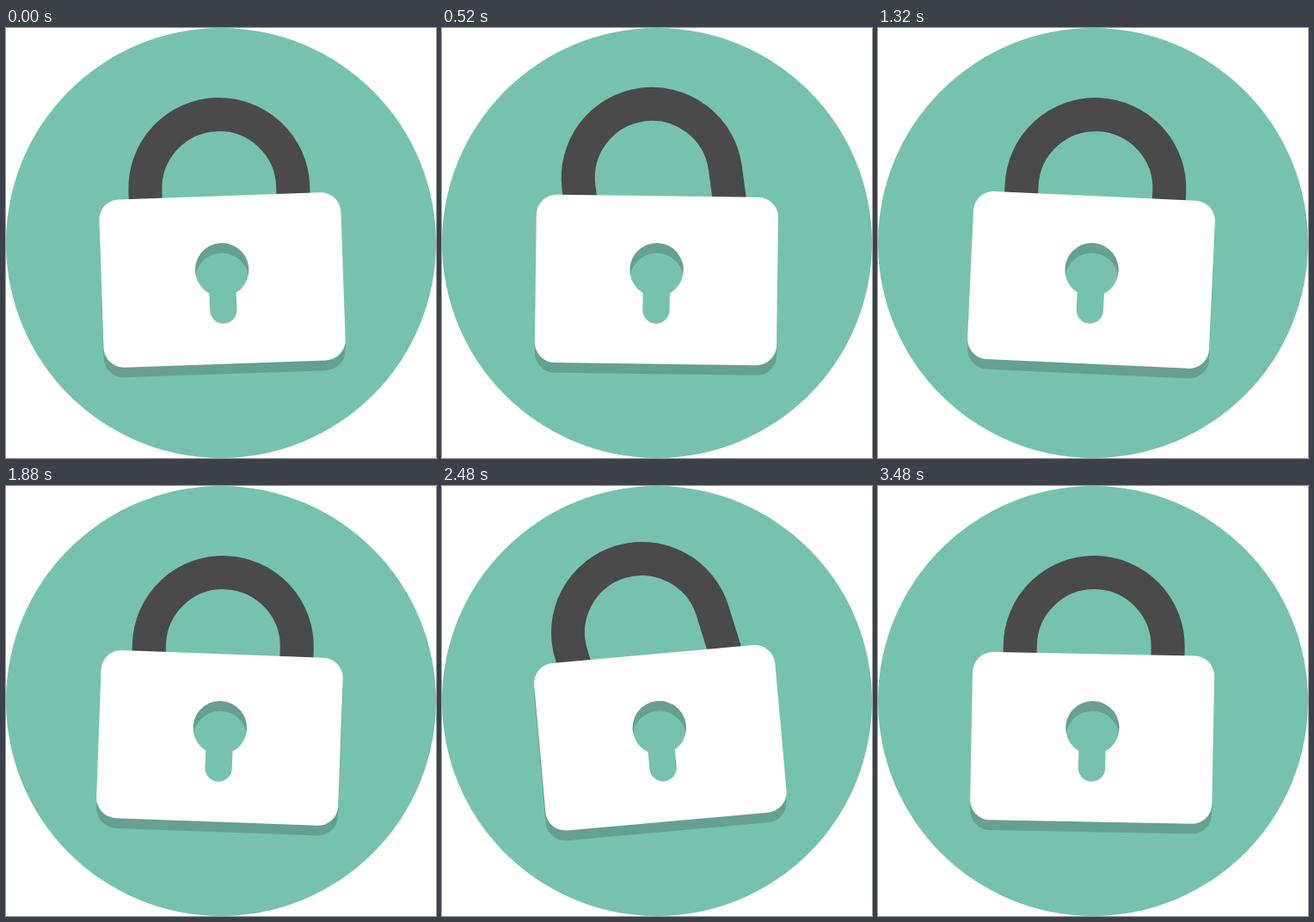
These frames come from a looping animation (500x500 px, 3.52 s). An HTML page:

```html
<!DOCTYPE html>
<html lang="en">
<head>
<meta charset="utf-8">
<title>Padlock</title>
<style>
  html, body { margin: 0; width: 100%; height: 100%; overflow: hidden; background: #fff; }
  svg { display: block; width: 100%; height: 100%; }
</style>
</head>
<body>
<svg viewBox="0 0 64 64">
  <defs>
    <path id="plate" fill-rule="evenodd" d="
      M17 25H47a3 3 0 0 1 3 3V47a3 3 0 0 1 -3 3H17a3 3 0 0 1 -3 -3V28a3 3 0 0 1 3 -3Z
      M30 39.46a4 4 0 1 1 4 0V42a2 2 0 0 1 -4 0Z"/>
  </defs>
  <circle cx="32" cy="32" r="32" fill="#76c2af"/>
  <g transform="translate(0 1.5)" opacity=".2"><use id="shadow" href="#plate" fill="#231f20"/></g>
  <g id="lock">
    <path id="shackle" d="M21 31V23.87a11 11 0 0 1 22 0V31" fill="none" stroke="#4a4a4a" stroke-width="5"/>
    <use href="#plate" fill="#fff"/>
  </g>
</svg>
<script>
const LOOP = 3520, STEP = 40;
const OPEN_EVERY = 2000, RISE = 327, FALL = 390, OPEN_ANGLE = 33;

// Turning points of the sway: [ms, degrees]
const sway = [[0, -2], [690, 1.2], [900, .9], [1570, 3.4], [1716, 3.4], [2375, -5.5], [3110, 2.4], [3900, -.5]];

// Sine easing from one turning point to the next
function tiltAt(t) {
  const i = sway.findIndex(([time]) => time > t);
  const [t0, a] = sway[i - 1], [t1, b] = sway[i];
  return a + (b - a) * (1 - Math.cos(Math.PI * (t - t0) / (t1 - t0))) / 2;
}

// The shackle speeds up while opening and slows down while closing
function openingAt(t) {
  const rise = t / RISE, fall = (t - RISE) / FALL;
  return OPEN_ANGLE * (rise < 1 ? rise ** 1.5 : Math.max(0, 1 - fall) ** 2);
}

const rotate = (id, angle, x, y) =>
  document.getElementById(id).setAttribute('transform', `rotate(${angle} ${x} ${y})`);

function draw(now) {
  const t = Math.floor(now % LOOP / STEP) * STEP;
  const tilt = tiltAt(t);
  rotate('lock', tilt, 32, 32);
  rotate('shadow', tilt, 32, 32);
  rotate('shackle', -openingAt(t % OPEN_EVERY), 21, 29);
}

const start = performance.now();
function tick() {
  draw(performance.now() - start);
  requestAnimationFrame(tick);
}
tick();
</script>
</body>
</html>
```
